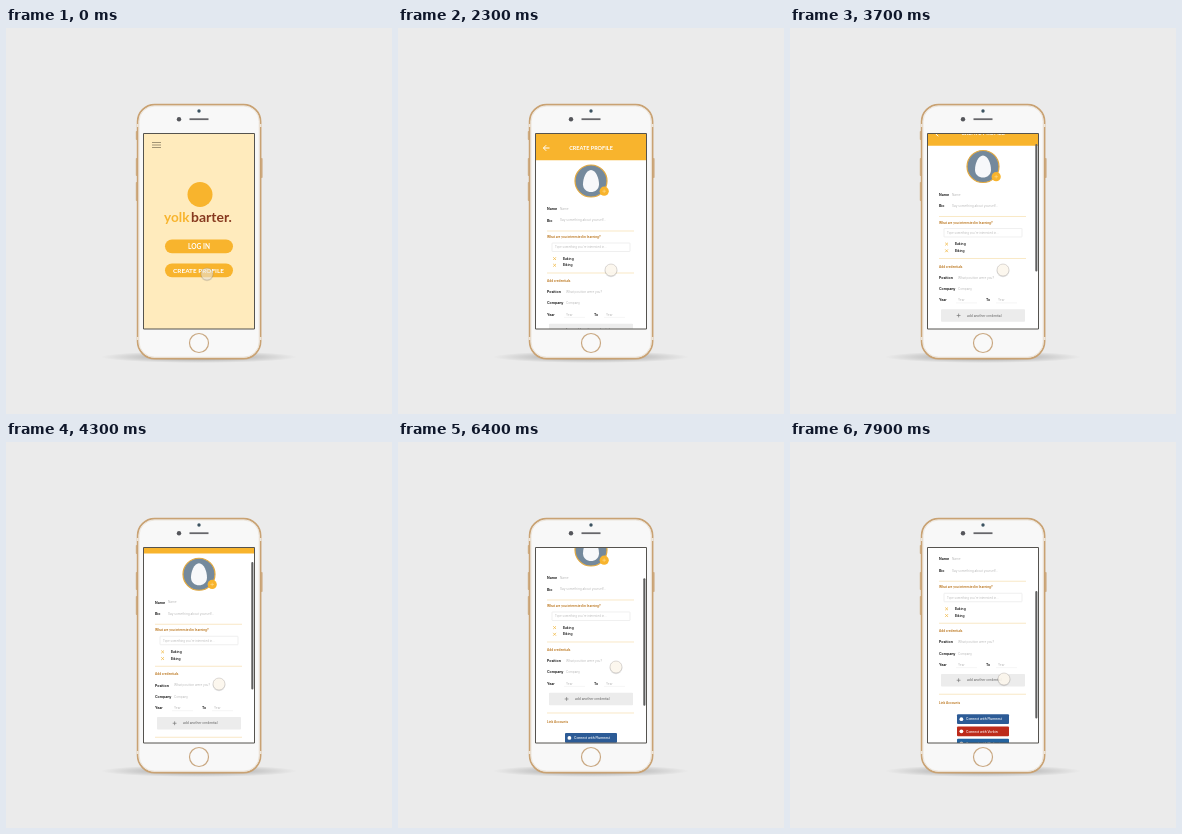
An HTML page with a canvas for the animation above (8000 ms loop, 386 by 386 pixels).

```html
<!DOCTYPE html>
<html lang="en">
<head>
<meta charset="utf-8">
<title>Phone prototype</title>
<style>
html, body { margin: 0; width: 100%; height: 100%; overflow: hidden; background: #ebebeb; }
canvas { display: block; width: 386px; height: 386px; }
</style>
</head>
<body>
<canvas id="stage"></canvas>
<script>
const LOOP = 8000, SIZE = 386;
const VIEW = { x: 137.5, y: 105.5, w: 111, h: 195.5 };
const YELLOW = '#f8b42d', CREAM = '#ffebbd', BROWN = '#bd7a24', PALE = '#b9b9b9', INK = '#1d1d1d';
const UI = 'Inter, "Open Sans", sans-serif', BRAND = 'Lato, "Open Sans", sans-serif';

const canvas = document.getElementById('stage');
const ctx = canvas.getContext('2d');
const dpr = window.devicePixelRatio || 1;
canvas.width = canvas.height = SIZE * dpr;

// Each key is [time, value, ...]; motion between keys is linear or smoothed.
const smooth = u => u * u * (3 - 2 * u);
function track(keys, t, ease = u => u) {
  if (t <= keys[0][0]) return keys[0].slice(1);
  for (let i = 1; i < keys.length; i++) {
    const a = keys[i - 1], b = keys[i];
    if (t <= b[0]) {
      const u = ease((t - a[0]) / (b[0] - a[0]));
      return a.slice(1).map((v, k) => v + (b[k + 1] - v) * u);
    }
  }
  return keys[keys.length - 1].slice(1);
}

const SLIDE = [[1400, 0], [2050, 1]];
const SCROLL = [[2650, 0], [3700, 14.5], [5000, 28], [6400, 45], [8000, 65]];
const POINTER = [[0, 201, 246], [250, 177, 222], [500, 190, 194], [750, 219, 212], [1000, 213, 242],
  [5300, 213, 242], [6300, 218, 225], [6800, 218, 225], [7700, 214, 237]];

function box(x, y, w, h, r, fill, stroke, lw = 1) {
  ctx.beginPath();
  ctx.roundRect(x, y, w, h, r);
  paint(fill, stroke, lw);
}
function disc(x, y, r, fill, stroke, lw = 1) {
  ctx.beginPath();
  ctx.arc(x, y, r, 0, Math.PI * 2);
  paint(fill, stroke, lw);
}
function paint(fill, stroke, lw) {
  if (fill) { ctx.fillStyle = fill; ctx.fill(); }
  if (stroke) { ctx.strokeStyle = stroke; ctx.lineWidth = lw; ctx.stroke(); }
}
function path(color, lw, ...pts) {
  ctx.beginPath();
  for (let i = 0; i < pts.length; i += 2) ctx.lineTo(pts[i], pts[i + 1]);
  paint(null, color, lw);
}
// Large font drawn at a tenth keeps small text evenly spaced.
function text(str, x, y, size, color, weight = 400, align = 'left', family = UI) {
  ctx.save();
  ctx.translate(x, y);
  ctx.scale(.1, .1);
  ctx.font = `${weight} ${size * 10}px ${family}`;
  ctx.textAlign = align;
  ctx.textBaseline = 'alphabetic';
  ctx.fillStyle = color;
  ctx.fillText(str, 0, size * 3.6);
  ctx.restore();
}
function plus(x, y, r, color, lw) {
  path(color, lw, x - r, y, x + r, y);
  path(color, lw, x, y - r, x, y + r);
}

function drawPhone() {
  ctx.fillStyle = '#ebebeb';
  ctx.fillRect(0, 0, SIZE, SIZE);
  ctx.save();
  ctx.translate(193, 329);
  ctx.scale(98, 6);
  const g = ctx.createRadialGradient(0, 0, 0, 0, 0, 1);
  g.addColorStop(0, 'rgba(0,0,0,.4)');
  g.addColorStop(.6, 'rgba(0,0,0,.14)');
  g.addColorStop(1, 'rgba(0,0,0,0)');
  disc(0, 0, 1, g);
  ctx.restore();

  for (const [x, y, h] of [[129.8, 103, 9], [129.8, 130, 18], [129.8, 154, 19], [254.8, 130, 20]])
    box(x, y, 1.8, h, .8, '#cfae86');
  box(131.6, 76.6, 123, 254, 17, '#f8f8f8', '#c9a273', 1.7);
  box(133, 78, 120.2, 251.2, 15.5, null, '#e6dccd', .7);
  for (const y of [96, 309])
    for (const x of [130.7, 253.7]) box(x, y, 1.8, 3, 0, '#eee5d8');

  disc(193, 83, 1.7, '#3c5361');
  disc(173, 91.3, 2.2, '#55565b');
  path('#66666a', 1.8, 183.5, 91.2, 202.5, 91.2);
  disc(193, 315, 9.5, '#f9f9f9', '#c9a882', 1.2);
}

function drawLogin() {
  box(137, 105, 112, 197, 0, CREAM);
  for (const y of [114.5, 117, 119.5]) path('#8a7d63', .8, 146, y, 155, y);
  disc(194, 166.5, 12.5, YELLOW);
  text('yolk', 183.5, 189, 13.6, YELLOW, 700, 'right', BRAND);
  text('barter.', 185, 189, 14, '#87391f', 700, 'left', BRAND);
  box(159, 211.5, 68, 13.7, 6.85, YELLOW);
  text('LOG IN', 193, 218.4, 6.6, '#fff', 700, 'center', BRAND);
  box(159, 235.5, 68, 13.7, 6.85, YELLOW);
  text('CREATE PROFILE', 192.5, 242.4, 6.4, '#fff', 700, 'center', BRAND);
}

function drawAvatar(x, y) {
  disc(x, y, 16, '#74899c', '#e3a93f', 1.2);
  ctx.beginPath();
  ctx.moveTo(x, y - 11);
  ctx.bezierCurveTo(x + 5, y - 11, x + 8, y - 2.5, x + 8, y + 3.2);
  ctx.bezierCurveTo(x + 8, y + 13.6, x - 8, y + 13.6, x - 8, y + 3.2);
  ctx.bezierCurveTo(x - 8, y - 2.5, x - 5, y - 11, x, y - 11);
  paint('#f7f8fa');
  disc(x + 13.2, y + 10.2, 4.6, YELLOW);
  plus(x + 13.2, y + 10.2, 1.8, '#ffe0a0', .5);
}

function field(label, hint, y, hintX) {
  text(label, 149, y, 3.5, INK, 700);
  text(hint, hintX, y, 3.1, PALE);
}
const rule = y => path('#f6dfae', .7, 149, y, 236, y);
const heading = (str, y) => text(str, 149, y, 3.05, BROWN, 700);

function linkButton(name, y, color) {
  box(167, y, 52, 9.8, 1, color);
  disc(171.4, y + 4.9, 1.9, '#fff');
  text('Connect with ' + name, 176, y + 4.9, 3.25, '#fff', 500);
}

function drawProfile() {
  box(137, 105, 112, 28 - .8, 0, YELLOW);
  path('#fff', 1, 151.5, 120, 145.5, 120);
  path('#fff', 1, 148.2, 117.2, 145.4, 120, 148.2, 122.8);
  text('CREATE PROFILE', 193, 120, 5.5, '#fff', 700, 'center', BRAND);
  drawAvatar(193, 153);

  field('Name', 'Name', 181, 162);
  field('Bio', 'Say something about yourself...', 192.3, 162);
  rule(203);

  heading('What are you interested in learning?', 209);
  box(154, 215, 78, 8.5, .5, null, '#e9e9e9', .7);
  text("Type something you're interested in...", 157, 219.4, 2.9, PALE);
  ['Baking', 'Biking'].forEach((name, i) => {
    const y = 230.6 + i * 6.7;
    path('#f2bc4c', .8, 155.2, y - 1.4, 158, y + 1.4);
    path('#f2bc4c', .8, 158, y - 1.4, 155.2, y + 1.4);
    text(name, 164.8, y, 3.3, INK, 600);
  });
  rule(245);

  heading('Add credentials', 253);
  field('Position', 'What position were you?', 264, 168);
  field('Company', 'Company', 275.2, 168);
  field('Year', 'Year', 286.4, 168);
  text('To', 196, 286.4, 3.5, INK, 700);
  text('Year', 208, 286.4, 3.1, PALE);
  path('#ececec', .5, 166, 289.4, 187, 289.4);
  path('#ececec', .5, 206, 289.4, 227, 289.4);
  box(151, 295.7, 84, 12.5, .8, '#ececec');
  plus(168.6, 302, 1.9, '#777', .7);
  text('add another credential', 177, 302, 3.2, '#707070', 500);
  rule(316);

  heading('Link Accounts', 325);
  linkButton('Plumnest', 336, '#2c5b96');
  linkButton('Vorbin', 348.2, '#bd2b1b');
  linkButton('Marlowin', 360.4, '#24639f');
}

function drawPointer(t) {
  const [x, y] = track(POINTER, t, smooth);
  const solid = track([[700, .5], [1000, .88]], t)[0];
  disc(x, y + .8, 6.4, 'rgba(90,90,90,.16)');
  disc(x, y, 6, `rgba(255,250,240,${solid})`, 'rgba(150,145,140,.45)', .7);
}

function draw(t) {
  ctx.setTransform(dpr, 0, 0, dpr, 0, 0);
  drawPhone();

  const [slide] = track(SLIDE, t, smooth);
  const [scroll] = track(SCROLL, t);
  ctx.save();
  ctx.beginPath();
  ctx.rect(VIEW.x, VIEW.y, VIEW.w, VIEW.h);
  ctx.clip();
  ctx.fillStyle = '#fff';
  ctx.fill();
  if (slide < 1) {
    ctx.save();
    ctx.translate(-slide * VIEW.w, 0);
    drawLogin();
    ctx.restore();
  }
  if (slide > 0) {
    ctx.save();
    ctx.translate((1 - slide) * VIEW.w, 0);
    box(VIEW.x, VIEW.y, VIEW.w, VIEW.h, 0, '#fff');
    ctx.translate(0, -scroll);
    drawProfile();
    ctx.restore();
  }
  if (scroll > 0) box(245.3, 106.2 + scroll * .67, 2.1, 127.5, 1, '#606060');
  drawPointer(t);
  ctx.restore();

  box(VIEW.x, VIEW.y, VIEW.w, VIEW.h, 0, null, '#55534f', 1);
}

const start = performance.now();
function frame() {
  draw((performance.now() - start) % LOOP);
  requestAnimationFrame(frame);
}
frame();
</script>
</body>
</html>
```
